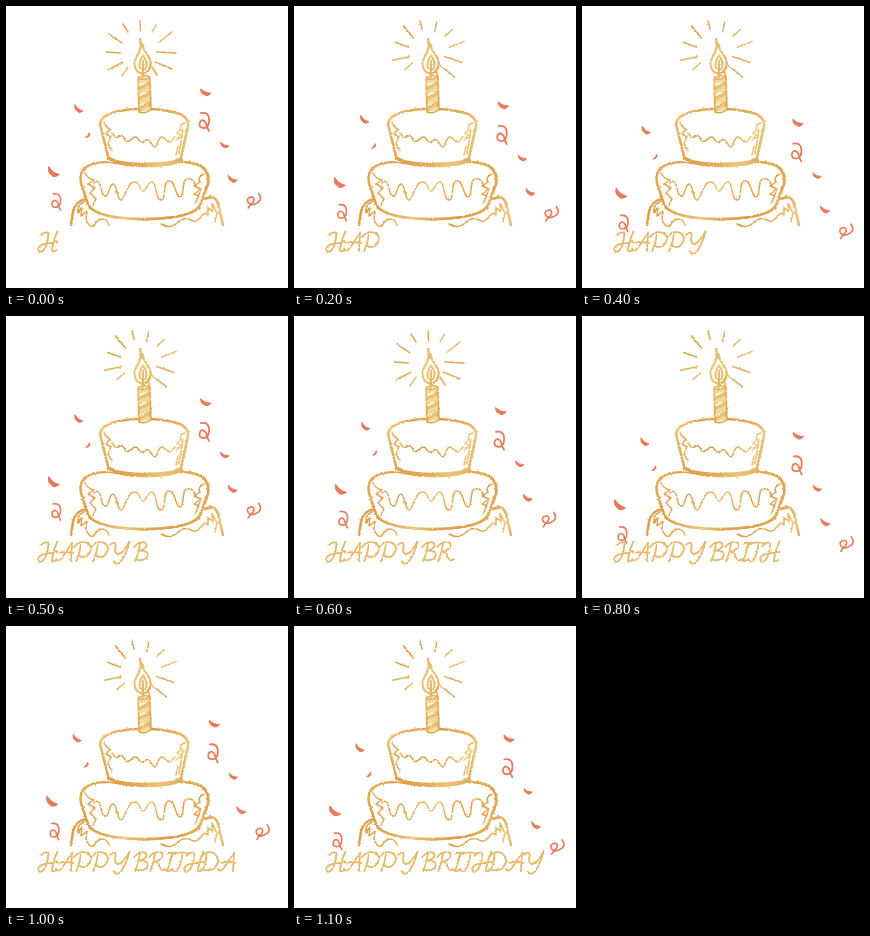
An HTML page that plays this animation: 282x282 px, repeating every 1.4 s.

```html
<!DOCTYPE html>
<html lang="en">
<head>
<meta charset="utf-8">
<title>Birthday cake</title>
<style>
  html, body { margin: 0; width: 100%; height: 100%; overflow: hidden; background: #fff; }
  svg { display: block; width: 100%; height: 100%; }
  path { fill: none; stroke-linecap: round; stroke-linejoin: round; }
  .gold path { stroke: url(#gold); }
  .fine { stroke-width: 1.5; }
  .bold { stroke-width: 2.6; }
  #letters path { stroke: #e6b767; }
  #confetti path { stroke: #e8795a; }
  #confetti .arc { fill: #e8795a; stroke-width: .9; }
  #confetti .curl { stroke-width: 1.8; }
</style>
</head>
<body>
<svg viewBox="0 0 282 282" role="img" aria-label="HAPPY BRITHDAY">
  <defs>
    <linearGradient id="gold" gradientUnits="userSpaceOnUse" x1="60" y1="90" x2="92" y2="112" spreadMethod="reflect">
      <stop offset="0" stop-color="#dd9f4a"/>
      <stop offset=".55" stop-color="#e3ac57"/>
      <stop offset="1" stop-color="#eac67c"/>
    </linearGradient>
    <clipPath id="wax"><path d="M132 72L144 71L145 104L133 106Z"/></clipPath>
    <!-- uneven brush edge -->
    <filter id="brush" filterUnits="userSpaceOnUse" x="0" y="0" width="282" height="282" color-interpolation-filters="sRGB">
      <feTurbulence type="fractalNoise" baseFrequency=".35" numOctaves="2" seed="4"/>
      <feDisplacementMap in="SourceGraphic" scale="2.4" xChannelSelector="R" yChannelSelector="G"/>
    </filter>
  </defs>

  <g class="gold" filter="url(#brush)">
    <path id="rays" class="fine" d="M134 15L134.500 25M117 18L122 26M151 18L146 26M103 28L116 37M166 26L153 36M100 46L114 47M151 46L169 47M102 64L117 56M149 56L166 63M116 70L122 61M146 61L151 69"/>

    <!-- flame and candle -->
    <path d="M134 33Q136 42 141 48Q148 58 142 65Q137 70 131 65Q126 58 131 50Q136 43 134 33Z" stroke-width="2.2"/>
    <path d="M137 49Q142 57 140 62Q137 66 134 62Q132 57 137 49M137 55L137 71" stroke-width="2"/>
    <g clip-path="url(#wax)">
      <path d="M132 72L144 71L145 104L133 106Z" style="fill:#f0d99c" stroke-width="0"/>
      <path d="M129 84L148 75M129 94L148 85M129 104L148 95" style="stroke:#e6c272" stroke-width="4"/>
      <path d="M130 81L139 77M130 91L139 87M130 101L139 97" style="stroke:#fff8e4" stroke-width="1.6"/>
    </g>
    <path class="fine" d="M132 72Q138 68 144 71L145 104Q139 108 133 106ZM132 72Q138 75 144 71"/>

    <!-- top tier -->
    <path class="bold" d="M131 103Q106 104 97 112Q93 115 95 122L102 150Q105 157 137 158Q169 158 175 152L182 120Q183 112 174 108Q163 104 146 103"/>
    <path class="bold" d="M102 152Q116 160 138 160Q165 160 176 154"/>
    <path class="fine" d="M98 116Q99 121 104 123L100 128L105 131L102 138L106 145M179 117Q173 118 175 123L171 127L176 130L170 134M172 140L170 149M177 124L173 148"/>
    <path class="fine" d="M106 127C108 130 109 132 112 131S116 128 118 132S120 136 123 135S127 130 130 131S133 136 136 136S140 132 143 134S146 141 149 141S152 130 156 131S161 137 164 136S167 132 169 131"/>

    <!-- middle tier -->
    <path class="bold" d="M101 156Q86 156 79 162Q73 167 75 177L82 198Q86 207 108 211Q137 215 168 211Q190 207 194 199L202 178Q204 164 193 159Q185 156 175 156"/>
    <path class="fine" d="M83 202Q96 212 137 214Q181 213 194 202M102 156Q137 163 175 156"/>
    <path class="fine" d="M79 167Q82 173 88 174L82 178L89 182L84 187L90 193L87 199M198 168Q191 171 194 176L188 180L195 183L188 188L193 190M194 186L189 198"/>
    <path class="fine" d="M88 177C91 173 94 176 95 182S97 190 100 190S103 178 107 178S111 194 115 194S121 176 128 176S133 185 137 185S141 176 146 176S149 194 155 194S156 175 163 175S169 191 174 191S175 174 181 173S188 176 190 180"/>

    <!-- bottom tier -->
    <path class="bold" d="M80 193Q69 195 67 206L65 219M199 193Q209 188 212 198L217 219"/>
    <path class="fine" d="M78 196Q71 199 72 207L76 201L75 210L81 205L80 213Q83 222 88 220Q91 213 97 213Q102 215 103 219M155 218C160 221 165 222 170 218S178 211 183 213S189 217 194 212S198 206 202 209L202 202L207 205L206 197L211 207L209 216"/>
  </g>

  <g id="letters" class="gold" filter="url(#brush)"></g>
  <g id="confetti"></g>
</svg>

<script>
const STEP = 100, LOOP = 1400, LAST = 11;
const $ = id => document.getElementById(id);

const addPath = (parent, d, name) => {
  const p = document.createElementNS('http://www.w3.org/2000/svg', 'path');
  p.setAttribute('d', d);
  p.setAttribute('class', name);
  parent.append(p);
  return p;
};

// Brush strokes of each capital; y = 0 is the top of the line.
const glyphs = {
  H: 'M2 4Q5 0 9 1Q9 10 5 16Q1 20 0 15Q1 12 5 11L17 9M17 0Q13 8 12 17Q14 18 16 16',
  A: 'M0 15Q2 19 6 13L14 1L13 17M3 10Q8 8 15 10',
  P: 'M6 3Q5 10 2 17M0 5Q4 -1 11 1Q18 5 12 12Q8 15 4 12',
  Y: 'M0 3Q4 -1 5 3Q3 10 7 11Q12 10 17 0Q14 12 9 18Q5 21 3 17',
  B: 'M6 2Q5 10 2 17M1 5Q5 -1 11 1Q14 5 6 8Q15 8 12 14Q8 18 2 15',
  R: 'M6 2Q5 10 2 17M1 5Q5 -1 12 1Q15 6 6 9Q10 10 11 15Q13 18 16 15',
  I: 'M2 2Q6 0 9 2M6 2Q5 10 2 16M0 16Q3 18 6 16',
  T: 'M0 3Q6 -1 15 2M9 2Q8 12 4 17Q1 18 0 15',
  D: 'M5 2Q4 10 2 16M0 5Q5 -2 12 2Q18 8 11 15Q6 18 0 15'
};
const starts = [32, 50, 68, 85, 104, 127, 142, 159, 166, 178, 195, 212, 230];
const letters = [...'HAPPYBRITHDAY'].map((c, i) => {
  const el = addPath($('letters'), glyphs[c], 'fine');
  el.setAttribute('transform', `translate(${starts[i]} 225.500) scale(1.15)`);
  return { el, from: i > 7 ? i - 1 : i };   // I and T arrive together
});

const shapes = {
  arc: 'M-4 -4Q-1 1 4 2Q0 5 -2 2Q-5 0 -4 -4Z',
  curl: 'M-3 -9Q4 -10 5 -4Q6 5 0 6Q-6 6 -4 0Q-1 -4 2 1Q3 6 5 9'
};
// shape, x, y, size, turn
const pieces = [
  ['arc', 73, 103, 1, 0], ['arc', 82, 129, .6, -90], ['arc', 48, 166, 1.3, 0], ['curl', 50, 196, .9, 0],
  ['arc', 200, 86, 1.1, -15], ['curl', 198, 116, 1, 0], ['arc', 219, 139, .9, -15],
  ['arc', 227, 173, 1, -10], ['curl', 247, 194, .9, 60]
].map(([shape, x, y, size, turn]) => ({ el: addPath($('confetti'), shapes[shape], shape), x, y, size, turn }));

// Three falls of 5, 4 and 3 steps, each quicker than the one before.
const fall = n => n < 5 ? n * 5.4 : n < 9 ? (n - 5) * 7.7 : (n - 9) * 9.6;

function draw(n) {
  $('rays').setAttribute('transform', n % 3 ? 'rotate(16 135 47)' : '');
  letters.forEach(l => { l.el.style.visibility = n >= l.from ? 'visible' : 'hidden'; });
  const drop = fall(n);
  pieces.forEach(({ el, x, y, size, turn }) => {
    const right = x > 141;
    const dy = right ? drop * (1 + drop / 52) : drop;
    const dx = right ? 0.9 * dy - 0.012 * dy * dy : -dy * dy / 54;
    el.setAttribute('transform', `translate(${x + dx} ${y + dy}) rotate(${turn}) scale(${size})`);
  });
}

const begin = performance.now();
function tick() {
  const t = (performance.now() - begin) % LOOP;
  draw(Math.min(LAST, Math.floor(t / STEP)));
  requestAnimationFrame(tick);
}
tick();
</script>
</body>
</html>
```
